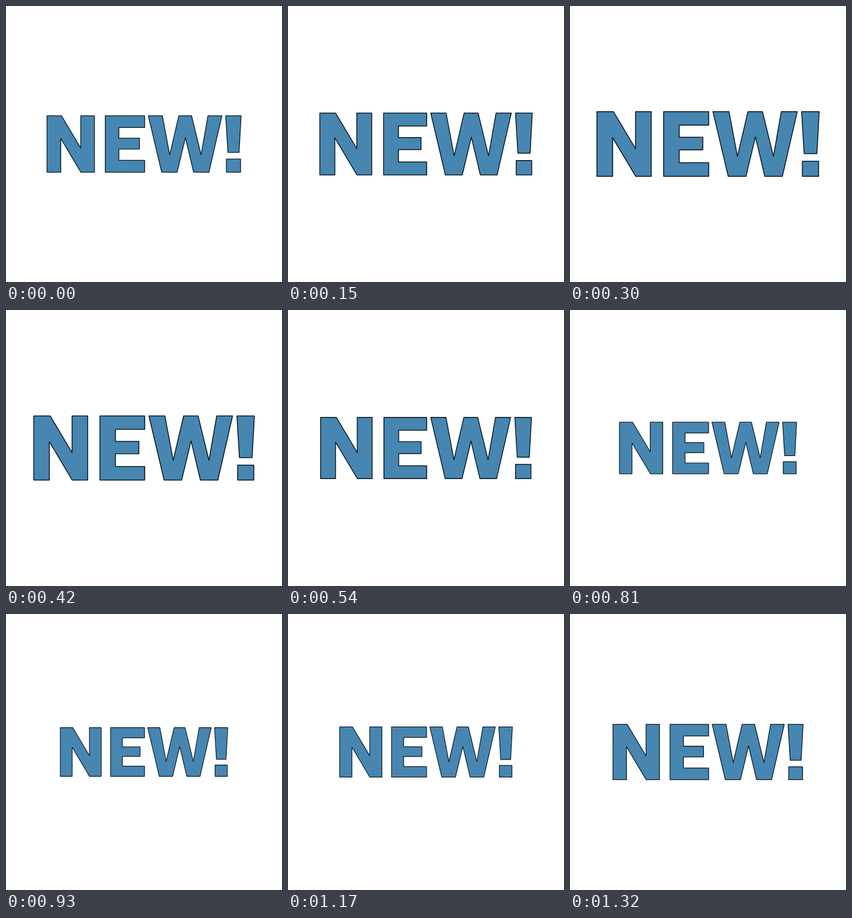
An HTML page for the animation above (1350 ms loop, 480 by 480 pixels).

```html
<!DOCTYPE html>
<html lang="en">
<head>
<meta charset="utf-8">
<title>NEW!</title>
<style>
  html, body { margin: 0; width: 100%; height: 100%; overflow: hidden; background: #fff; }
  svg { display: block; width: 100vw; height: 100vh; }
</style>
</head>
<body>
<svg viewBox="0 0 480 480" role="img" aria-label="NEW!">
  <g id="word" fill="#4686b1" stroke="#07131b" stroke-width="1.5" stroke-linejoin="round">
    <path d="M46.8 183.8H75.6L114 248.2V183.8H141.3V296.2H114.2L74.2 229V296.2H46.8Z"/>
    <path d="M162.8 183.8H241.3V207.3H190V228.3H231V250.2H190V272.6H241.3V296.2H162.8Z"/>
    <path d="M248.6 183.8H276.6L291.2 261.6L309.4 183.8H334.8L353.8 261.6L367.4 183.8H395.2L369.4 296.2H338.8L322.5 227.6L306 296.2H275.2Z"/>
    <path d="M402.8 183.8H433.4L429.4 256.8H407.2Z"/>
    <path d="M404.1 270H432.4V296.2H404.1Z"/>
  </g>
</svg>
<script>
  const LOOP = 1350, STEP = 30;
  const BASE = 0.873, SWING = 0.129;
  const word = document.getElementById('word');
  const start = performance.now();

  // The word breathes around the stage centre, one sine wave per loop.
  function draw(ms) {
    const t = Math.floor((ms % LOOP) / STEP) * STEP;
    const s = BASE + SWING * Math.sin(2 * Math.PI * t / LOOP);
    word.setAttribute('transform', `translate(240 240) scale(${s}) translate(-240 -240)`);
  }

  function tick() {
    draw(performance.now() - start);
    requestAnimationFrame(tick);
  }

  draw(0);
  requestAnimationFrame(tick);
</script>
</body>
</html>
```
